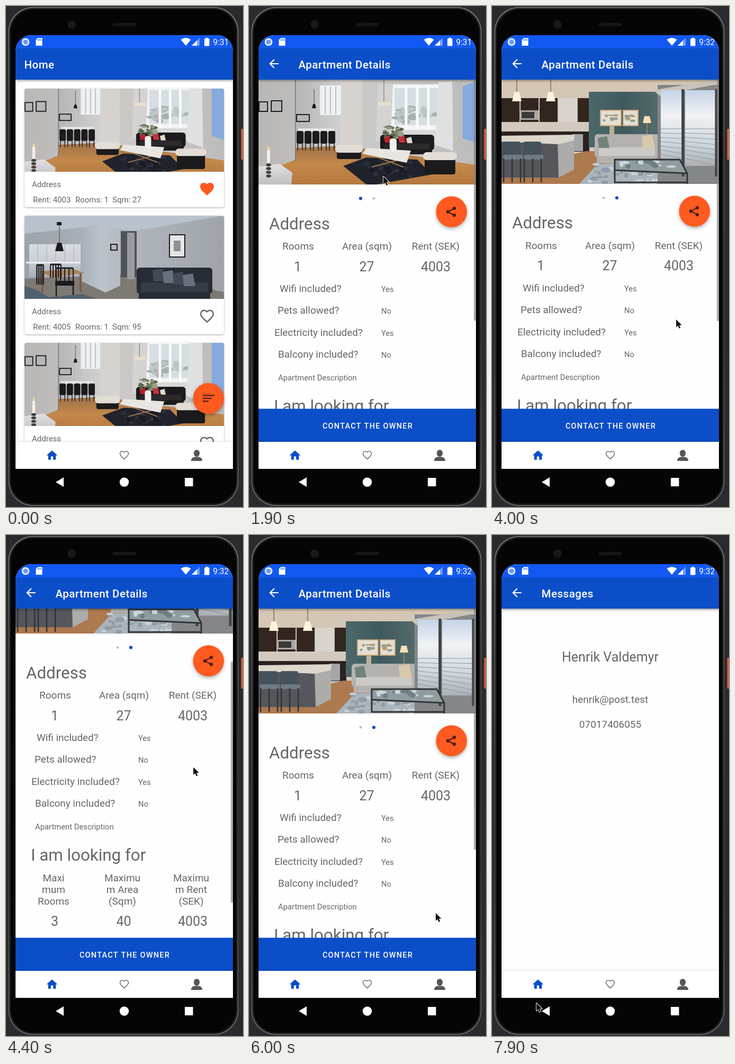
Animation of 448 by 946 pixels, one loop 8000 ms. Source, as an HTML page with a canvas:

```html
<!DOCTYPE html>
<html lang="en">
<head>
<meta charset="utf-8">
<title>Apartment app</title>
<style>
html, body { margin: 0; width: 100%; height: 100%; overflow: hidden; background: #2a2b2d; }
canvas { display: block; width: 448px; height: 946px; }
</style>
</head>
<body>
<canvas id="stage"></canvas>
<script>
const W = 448, H = 946, LOOP = 8000, STEP = 100;
const BLUE = '#0b4ec8', ORANGE = '#ff5a1f', GREY = '#666', ICON = '#54565a', DARK = '#1b1b1e';
const OPEN = 1500, TAP = 2700, SEND = 7000, DRAG = 340;
const cv = document.getElementById('stage'), c = cv.getContext('2d');
const dpr = window.devicePixelRatio || 1;
cv.width = W * dpr;
cv.height = H * dpr;

const HEART = new Path2D('M12 21.35l-1.45-1.32C5.4 15.36 2 12.28 2 8.5 2 5.42 4.42 3 7.5 3c1.74 0 3.41.81 4.5 2.09C13.09 3.81 14.76 3 16.5 3 19.58 3 22 5.42 22 8.5c0 3.78-3.4 6.86-8.55 11.54z');
const HOUSE = new Path2D('M10 20v-6h4v6h5v-8h3L12 3 2 12h3v8z');
const BACK = new Path2D('M20 11H7.83l5.59-5.59L12 4l-8 8 8 8 1.41-1.41L7.83 13H20z');
const ARROW = new Path2D('M0 0V14.5L3.4 11.4 5.7 16.8 8.2 15.7 5.9 10.5H10.6z');

// Motion: eased ramps between two times
function ramp(t, a, b) {
  const u = Math.min(1, Math.max(0, (t - a) / (b - a)));
  return u * u * (3 - 2 * u);
}
const scrollAt = t => DRAG * (ramp(t, 3970, 4900) - ramp(t, 5300, 5800));
const barAt = t => 1 - ramp(t, 2200, 2500) + ramp(t, 3800, 3900) - ramp(t, 6400, 6700);
// Each pointer move: start, end, x, y
const MOVES = [[200, 1100, 254, 322], [1900, 2600, 238, 359], [3200, 3800, 348, 593],
  [3970, 4900, 362, 245], [5300, 6000, 353, 714], [6000, 6600, 236, 789], [7100, 7900, 84, 884]];

// Drawing helpers
function rect(col, x, y, w, h) { c.fillStyle = col; c.fillRect(x, y, w, h); }
function trace(p) {
  c.beginPath();
  for (let i = 0; i < p.length; i += 2) c.lineTo(p[i], p[i + 1]);
}
function poly(col, ...p) { c.fillStyle = col; trace(p); c.fill(); }
function line(col, w, ...p) { c.strokeStyle = col; c.lineWidth = w; trace(p); c.stroke(); }
function disc(col, x, y, rx, ry = rx) {
  c.fillStyle = col;
  c.beginPath();
  c.ellipse(x, y, rx, ry, 0, 0, 7);
  c.fill();
}
function round(col, x, y, w, h, r) {
  c.fillStyle = col;
  c.beginPath();
  c.roundRect(x, y, w, h, r);
  c.fill();
}
function fade(x0, y0, x1, y1, ...cols) {
  const g = c.createLinearGradient(x0, y0, x1, y1);
  cols.forEach((col, i) => g.addColorStop(i / (cols.length - 1), col));
  return g;
}
function text(s, x, y, size, { col = GREY, align = 'left', weight = 400, gap = 0 } = {}) {
  c.font = `${weight} ${size}px Roboto, sans-serif`;
  c.letterSpacing = gap + 'px';
  c.textAlign = align;
  c.fillStyle = col;
  c.fillText(s, x, y);
}
const mid = (s, x, y, size) => text(s, x, y, size, { align: 'center' });
function inBox(x, y, w, h, r, draw) {
  c.save();
  c.beginPath();
  c.roundRect(x, y, w, h, r);
  c.clip();
  draw();
  c.restore();
}
function icon(path, x, y, k, col, lw) {
  c.save();
  c.translate(x, y);
  c.scale(k, k);
  c.translate(-12, -12);
  c.strokeStyle = c.fillStyle = col;
  c.lineWidth = lw / k;
  lw ? c.stroke(path) : c.fill(path);
  c.restore();
}
function shadow(draw, blur, dy, a) {
  c.save();
  c.shadowColor = `rgba(0,0,0,${a})`;
  c.shadowBlur = blur * dpr;
  c.shadowOffsetY = dy * dpr;
  draw();
  c.restore();
}

// Furniture shared by the rooms
function frame(x, y, w, h, paper = '#b4b6b8') {
  rect(DARK, x, y, w, h);
  rect(paper, x + 2, y + 2, w - 4, h - 4);
}
function legs(col, x, y, w, h, n, lw = 2) {
  for (let i = 0; i < n; i++) line(col, lw, x + w * i / (n - 1), y, x + w * i / (n - 1), y + h);
}
function pendant(col, x, top, y, r) {
  line('#4a443e', 1, x, top, x, y);
  poly(col, x - r / 2, y, x + r / 2, y, x + r, y + 2 * r, x - r, y + 2 * r);
}
function sofa(back, seat, x, y, w, h) {
  round(back, x, y, w, h * .8, 6);
  round(seat, x + 8, y + h * .45, w - 16, h * .4, 4);
  rect(back, x + 4, y + h * .75, w - 8, h * .25);
}
function pillow(col, x, y, s) { poly(col, x, y + 3, x + s * .8, y, x + s, y + s, x + 2, y + s); }
function stool(x, y, w, h) {
  round(DARK, x + 3, y + 8, w - 6, h - 8, 4);
  round('#e2ddd5', x, y, w, 15, 7);
}
// Seeded soft spots for leaves, trees and woven cloth
function mottle(seed, n, x, y, w, h, r, ...cols) {
  const rnd = () => (seed = seed * 16807 % 2147483647) / 2147483647;
  for (let i = 0; i < n; i++) disc(cols[i % cols.length], x + rnd() * w, y + rnd() * h, r * (.5 + rnd()), r * (.3 + rnd() * .5));
}

// Rooms at 18,139 sized 411 x 198
function livingRoom() {
  rect(fade(18, 0, 429, 0, '#b9b7b5', '#cbc9c7', '#bdbcbb'), 18, 139, 411, 198);
  rect(fade(88, 0, 178, 0, '#b5b5b5', '#d0d1d1'), 88, 139, 90, 135);
  rect('#eef1f2', 134, 150, 40, 56);
  legs('#b9bfc2', 144, 152, 20, 52, 3);
  poly(fade(0, 262, 0, 337, '#9c7049', '#c4884b', '#b5773d'), 18, 318, 88, 290, 88, 268, 178, 264, 429, 300, 429, 337, 18, 337);
  rect('#d6d3cf', 174, 139, 40, 128);
  rect('#77706a', 87, 139, 1.5, 154);
  // dining chairs
  rect('#e4e3e1', 93, 231, 68, 8);
  for (let x = 90; x < 160; x += 15) {
    round(DARK, x, 236, 13, 24, 3);
    legs(DARK, x + 2, 258, 9, 15, 2, 1.5);
  }
  pendant(DARK, 123, 157, 185, 4);
  frame(18, 180, 18, 20);
  frame(41, 178, 22, 22);
  frame(89, 204, 26, 15);
  // window and curtains
  rect('#f2f4f5', 268, 148, 98, 86);
  rect('#d5dee2', 275, 155, 84, 70);
  mottle(5, 26, 278, 190, 78, 32, 7, '#a9b0b0', '#bcc5c8');
  legs('#fafafa', 297, 150, 42, 84, 3, 5);
  rect('#d9d9d7', 262, 234, 108, 24);
  poly('#d3d3d2', 243, 146, 272, 148, 268, 258, 240, 256);
  poly('#dfe0e0', 358, 144, 384, 142, 386, 274, 352, 262);
  poly('#85aadb', 404, 152, 429, 142, 429, 258, 404, 250);
  // seating
  sofa(DARK, '#2b292b', 248, 243, 102, 37);
  pillow('#b8232b', 255, 244, 14);
  pillow('#c3313a', 282, 244, 14);
  pillow('#e2d9cc', 297, 247, 12);
  poly('#20232c', 178, 302, 222, 286, 318, 290, 346, 318, 240, 337, 222, 337);
  mottle(9, 30, 220, 294, 85, 28, 5, '#2d313b', '#191c24');
  stool(163, 262, 52, 27);
  stool(329, 276, 64, 42);
  line('#a67b4c', 2, 228, 280, 292, 304);
  line('#a67b4c', 2, 293, 288, 232, 304);
  poly('#e9e5e1', 222, 268, 306, 273, 298, 296, 214, 279);
  mottle(3, 24, 257, 228, 30, 22, 5, '#6f8161', '#99a188', '#55644c');
  round('#f2f0ed', 266, 250, 13, 25, 5);
  line('#6d655c', 1, 255, 139, 255, 182);
  rect('#e8dfca', 244, 181, 24, 7);
  // candle on a ledge
  poly(fade(0, 300, 0, 337, '#dfdfe0', '#bfbfc1'), 18, 303, 58, 298, 82, 315, 80, 337, 18, 337);
  rect('#f3efe6', 34, 272, 6, 25);
  disc('#ffd98a', 37, 269, 1.8, 3.4);
  for (let y = 300; y < 328; y += 7) disc('#45413e', 37, y, 5, 3);
}

function kitchen() {
  rect(fade(0, 139, 0, 250, '#d6c6b3', '#d2c9bf'), 18, 139, 411, 198);
  // cupboards
  for (let x = 18; x < 180; x += 36) rect(x > 100 && x < 140 ? '#d8d4cd' : '#33251f', x, 175, 34, 45);
  rect('#aaa7a3', 53, 198, 35, 18);
  rect('#3c3937', 56, 201, 24, 12);
  rect('#2b2220', 18, 238, 166, 38);
  rect('#a4a5a6', 152, 243, 20, 32);
  // teal wall, floor, rug
  rect(fade(183, 0, 312, 0, '#4d686a', '#3f5a5d', '#536a6a'), 183, 163, 130, 105);
  poly('#ad794f', 18, 312, 178, 275, 429, 278, 429, 337, 18, 337);
  poly('#aab4bc', 200, 299, 330, 296, 395, 337, 165, 337);
  mottle(7, 60, 185, 300, 150, 35, 6, '#c8d0d5', '#8f9ca6');
  for (const [x, w] of [[204, 41], [247, 30]]) {
    rect('#caa778', x, 197, w, 31);
    rect('#e4dfd3', x + 2, 199, w - 4, 27);
    mottle(x, 8, x + 8, 207, w - 16, 12, 4, '#8b9a94', '#b39a79');
  }
  // sofa and lamp
  line('#a08b6d', 1.5, 293, 222, 293, 246);
  poly('#f6dfb9', 288, 209, 298, 209, 301, 222, 285, 222);
  rect('#bcb296', 222, 228, 9, 16);
  sofa('#b3b2ae', '#cbcac6', 194, 243, 122, 55);
  pillow('#70837b', 200, 247, 22);
  pillow('#d9c9ac', 283, 244, 25);
  // balcony door
  rect('#85868a', 313, 150, 116, 187);
  poly('#c8c2ba', 305, 160, 429, 139, 429, 148, 316, 170);
  for (const [x, w] of [[319, 39], [365, 58]]) {
    rect(fade(0, 155, 0, 315, '#bfd1e6', '#f1f3f5', '#cdd6dc', '#a0a5a8'), x, 160, w, 143);
    for (let y = 233; y < 295; y += 8) line('#8c979d', 1, x, y, x + w, y + w * (y - 233) / 250);
  }
  legs('#3f4447', 361, 158, 63, 165, 2, 5);
  // glass table
  poly('#8f9da1', 232, 291, 355, 291, 369, 317, 232, 310);
  mottle(4, 12, 245, 295, 95, 10, 7, '#cbd6d8', '#6f7f86');
  line('#343536', 3, 369, 337, 369, 317, 355, 291, 232, 291, 232, 334, 369, 334);
  line('#343536', 3, 232, 311, 369, 317);
  // island and stools
  rect('#55575c', 18, 256, 110, 69);
  poly('#adacaa', 124, 256, 155, 252, 155, 310, 126, 325);
  poly('#ddd6ca', 18, 246, 156, 244, 155, 255, 125, 262, 18, 257);
  for (const x of [20, 59]) {
    round('#46525b', x, 257, 34, 27, 4);
    round('#6f7b82', x + 1, 282, 37, 9, 3);
    legs('#303437', x + 2, 289, 32, 45, 3, 2.5);
  }
  for (const x of [47, 111]) pendant('#fff3dd', x, 139, 163, 9);
}

// Room at 35,396 sized 377 x 157
function greyFlat() {
  rect(fade(35, 0, 412, 0, '#9ba3ab', '#b1b7be', '#9fa4aa'), 35, 396, 377, 157);
  poly('#b8c2cc', 35, 396, 412, 396, 245, 424, 160, 416, 35, 430);
  poly('#7f7974', 35, 515, 245, 505, 412, 540, 412, 553, 35, 553);
  rect(fade(0, 450, 0, 512, '#d9dee2', '#c9cfd4', '#a9b0b6'), 44, 450, 101, 61);
  rect('#eceff1', 38, 483, 107, 3);
  legs('#a5abb1', 60, 451, 68, 32, 5, 1);
  poly(fade(141, 0, 216, 0, '#a6aeb7', '#bcc3ca', '#b3bac2'), 141, 420, 162, 414, 216, 420, 216, 528, 188, 541, 141, 519);
  rect('#505357', 217, 425, 30, 87);
  rect('#979ca0', 229, 428, 14, 88);
  frame(197, 449, 14, 13);
  frame(308, 431, 31, 44, '#e4e5e6');
  rect('#8d9194', 317, 443, 13, 20);
  // sofa
  sofa('#282c34', '#363b45', 247, 494, 143, 62);
  for (let i = 0; i < 4; i++) pillow(i % 2 ? '#67707e' : '#434a56', 277 + i * 19, 496 + i * 3, 24);
  // dining table
  poly('#a9825f', 63, 501, 128, 497, 148, 504, 88, 513);
  legs('#7e5d40', 69, 505, 72, 35, 2, 4);
  for (const [x, y, w, h] of [[58, 489, 13, 37], [84, 488, 20, 25], [95, 495, 32, 31]]) {
    legs(DARK, x, y, w, h, 5, 2);
    line(DARK, 3, x, y, x + w, y);
  }
  rect(DARK, 93, 519, 36, 9);
  legs(DARK, 95, 526, 32, 23, 2, 2.4);
  poly('#50606f', 35, 528, 64, 539, 80, 550, 145, 544, 172, 553, 35, 553);
  pendant(DARK, 101, 408, 447, 8);
  rect(DARK, 96, 408, 9, 6);
}

function card(y, liked, grey) {
  shadow(() => round('#fff', 35, y, 377, 224, 4), 3, 1, .35);
  inBox(35, y, 377, 157, [4, 4, 0, 0], () => {
    const k = 377 / 411;
    if (grey) c.translate(0, y - 396);
    else c.transform(k, 0, 0, k, 35 - 18 * k, y - 12.3 - 139 * k);
    (grey ? greyFlat : livingRoom)();
  });
  const [rent, size] = grey ? [4005, 95] : [4003, 27];
  text('Address', 49, y + 186, 15);
  text('Rent: ' + rent, 51, y + 214.5, 15);
  text('Rooms: 1', 131, y + 214.5, 15);
  text('Sqm: ' + size, 201, y + 214.5, 15);
  if (liked) icon(HEART, 380, y + 189.5, 1.3, ORANGE);
  else icon(HEART, 380, y + 189.5, 1.19, GREY, 2.5);
}

function fab(y) {
  shadow(() => disc(ORANGE, 382.8, y, 29.3), 6, 3, .3);
}

function home() {
  for (let i = 0; i < 3; i++) card(156 + i * 240, i === 0, i === 1);
  fab(741);
  for (let i = 0; i < 3; i++) rect('#5c2410', 372, 734 + i * 5.5, 22 - i * 5.5, 2.6);
}

function columns(y, titles, values) {
  titles.forEach((title, i) => {
    const words = title.split('/');
    words.forEach((w, k) => mid(w, (words[1] ? 90 : 93) + i * 130, y + k * 22, 19));
    mid(values[i], 92 + i * 130.5, y + words.length * 22 + 18.5, 25);
  });
}

function questions(x, y, lift, replies) {
  const rows = [['Wifi', 10], ['Pets', 6], ['Electricity', 0], ['Balcony', 7]];
  rows.forEach(([name, dx], i) => {
    text(`${name} ${name === 'Pets' ? 'allowed' : 'included'}?`, x + dx, y + i * 41.3, 18.9);
    text(replies[i], 250, y - lift + i * 41.3, 14.6);
  });
}

function details(t) {
  const s = scrollAt(t), k = ramp(t, 2750, 3000), bar = barAt(t);
  c.save();
  c.translate(0, -s);
  inBox(18, 139, 411, 198, 0, () => {
    c.translate(-411 * k, 0);
    if (k < 1) livingRoom();
    c.translate(411, 0);
    if (k > 0) kitchen();
  });
  c.globalAlpha = 1 - ramp(t, TAP + 500, TAP + 1100);
  disc('#f1f4f8', 237, 363, 28 * ramp(t, TAP, TAP + 400));
  c.globalAlpha = 1;
  for (const i of [0, 1]) {
    const on = k >= .5 === (i === 1);
    disc(on ? BLUE : '#b9bbbe', 211 + i * 25, 363.3, on ? 3.1 : 2.3);
  }
  fab(388.5);
  line('#4a2013', 2, 388, 382, 376, 388.5, 388, 395);
  for (let i = -1; i < 2; i++) disc('#4a2013', i ? 388 : 376, 388.5 + i * 6.5, 3.2);

  text('Address', 38, 421.5, 31.3);
  columns(460, ['Rooms', 'Area (sqm)', 'Rent (SEK)'], [1, 27, 4003]);
  questions(48, 540, 0, ['Yes', 'No', 'Yes', 'No']);
  text('Apartment Description', 55, 707, 14.8);
  text('I am looking for', 47, 766, 31.3);
  columns(804.5, ['Maxi/mum/Rooms', 'Maximu/m Area/(Sqm)', 'Maximu/m Rent/(SEK)'], [3, 40, 4003]);
  questions(51.7, 937, 4, ['Yes', 'Yes', 'No', 'Yes']);
  c.restore();

  rect(`rgba(130,130,130,${.65 * bar})`, 425, 139 + s * 226 / DRAG, 4, 455);
  rect(BLUE, 18, 760.5, 411, 62.5);
  text('CONTACT THE OWNER', 224.5, 798, 14.5, { col: '#fff', align: 'center', weight: 500, gap: 1.25 });
}

function messages() {
  mid('Henrik Valdemyr', 223.5, 239, 25);
  mid('henrik@post.test', 223.5, 317, 19);
  mid('07017406055', 223.5, 363.5, 19);
}

function topBar(t) {
  shadow(() => rect(BLUE, 18, 80, 411, 59), 4, 2, .4);
  rect('#1259f3', 18, 55, 411, 25);
  disc('#e9effd', 37, 68, 7.3);
  disc('#6f9af2', 37, 68, 4.6);
  poly('#fff', 60, 60.5, 68.5, 60.5, 68.5, 75, 56.5, 75, 56.5, 64);
  for (let i = 0; i < 3; i++) rect('#1259f3', 60 + i * 2.6, 62.5, 1.3, 3);
  c.fillStyle = '#fff';
  c.beginPath();
  c.moveTo(340, 75);
  c.lineTo(330.5, 63.5);
  c.quadraticCurveTo(340, 57, 349.5, 63.5);
  c.fill();
  poly('rgba(255,255,255,.4)', 351, 75, 366, 60, 366, 75);
  poly('#fff', 351, 75, 361, 65, 361, 75);
  round('#fff', 375, 61.5, 9.5, 14, 1);
  rect('#fff', 377.5, 60, 4.5, 2);
  inBox(388, 55, 32, 25, 0, () => text(t < 3600 ? '9:31' : '9:32', 391.3, 73.5, 15.6, { col: '#fff' }));

  const title = t < OPEN ? 'Home' : t < SEND ? 'Apartment Details' : 'Messages';
  text(title, t < OPEN ? 34.5 : 93.5, 118, 20.5, { col: '#fff', weight: 500, gap: .5 });
  if (t >= OPEN) icon(BACK, 47, 109, 1.1, '#fff');
}

function tabs() {
  shadow(() => rect('#fff', 18, 823, 411, 51), 3, -1, .12);
  icon(HOUSE, 87, 848.5, 1.04, BLUE);
  icon(HEART, 223.5, 848, .8, ICON, 1.3);
  disc(ICON, 360.5, 844.5, 5.6, 6.6);
  round(ICON, 350, 851.5, 21, 7.5, [7, 7, 0, 0]);
}

function phone() {
  rect('#2a2b2d', 0, 0, W, H);
  rect('#d95f43', 444.5, 232, 4, 58);
  round(fade(0, 0, 0, H, '#747474', '#4a4a4a', '#3d3d3d', '#666'), 4.5, 2, 435, 942, 46);
  round('#1c1c1c', 6.3, 3.8, 431.4, 938.4, 45);
  round('#050505', 9, 6.5, 426, 933, 43);
  disc('#17181a', 124, 35, 8);
  for (let x = 202; x < 245; x += 3.1) line('#2d2d2d', 1.3, x, 38, x + 3, 32);
  poly('#fff', 94, 899, 109, 890, 109, 908);
  disc('#fff', 223.5, 899, 8.7);
  round('#fff', 338, 891, 15.5, 16, 1);
}

function pointer(t) {
  let x = 462, y = 560;
  for (const [a, b, toX, toY] of MOVES) {
    const u = ramp(t, a, b);
    x += (toX - x) * u;
    y += (toY - y) * u;
  }
  c.save();
  c.translate(x, y);
  c.lineJoin = 'round';
  c.strokeStyle = '#fff';
  c.lineWidth = 1.8;
  c.stroke(ARROW);
  c.fillStyle = '#0a0a0a';
  c.fill(ARROW);
  c.restore();
}

function draw(now) {
  const t = Math.floor(now % LOOP / STEP) * STEP;
  c.setTransform(dpr, 0, 0, dpr, 0, 0);
  phone();
  inBox(18, 55, 411, 819, [30, 30, 0, 0], () => {
    rect('#fefefe', 18, 55, 411, 819);
    inBox(18, 139, 411, 684, 0, () => t < OPEN ? home() : t < SEND ? details(t) : messages());
    topBar(t);
    tabs();
  });
  pointer(t);
}

const start = performance.now();
function tick() {
  draw(performance.now() - start);
  requestAnimationFrame(tick);
}
tick();
</script>
</body>
</html>
```
